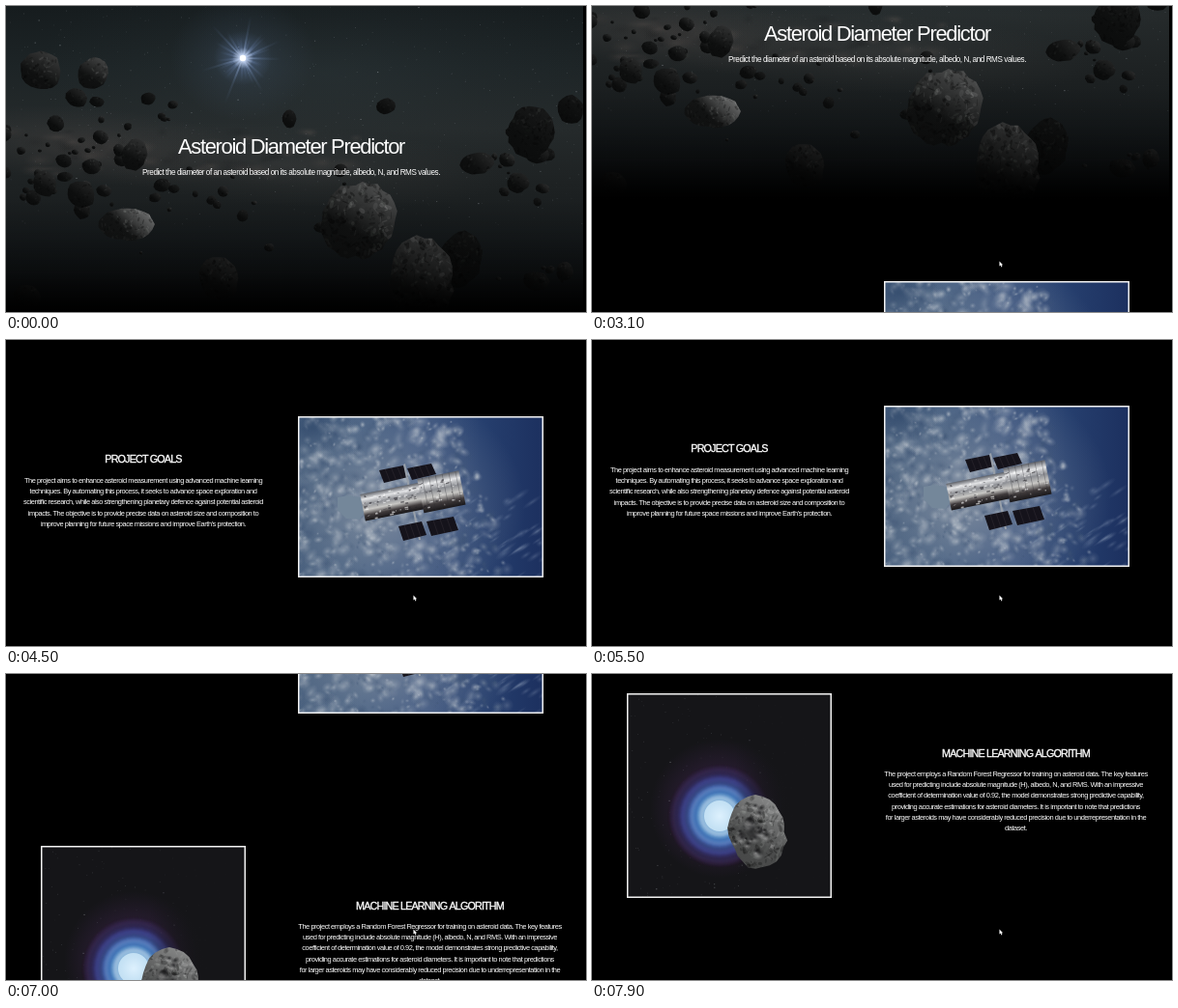
An HTML page with a canvas that plays this animation: 600x317 px, repeating every 8 s.

```html
<!DOCTYPE html>
<html lang="en">
<head>
<meta charset="utf-8">
<title>Asteroid Diameter Predictor</title>
<style>
html, body { margin: 0; width: 100%; height: 100%; overflow: hidden; background: #000; }
canvas { display: block; width: 600px; height: 317px; }
</style>
</head>
<body>
<canvas id="stage"></canvas>
<script>
const W = 600, H = 317, PAGE_H = 1004, LOOP = 8000;
const dpr = window.devicePixelRatio || 1;
const TAU = Math.PI * 2;

function setup(canvas, w, h) {
  canvas.width = w * dpr;
  canvas.height = h * dpr;
  const c = canvas.getContext('2d');
  c.scale(dpr, dpr);
  return c;
}

const stage = setup(document.getElementById('stage'), W, H);
const page = document.createElement('canvas');
const g = setup(page, W, PAGE_H);

let seed = 7;
function rnd(a = 0, b = 1) {
  seed = (seed + 0x6D2B79F5) | 0;
  let t = Math.imul(seed ^ (seed >>> 15), 1 | seed);
  t = (t + Math.imul(t ^ (t >>> 7), 61 | t)) ^ t;
  return a + (b - a) * (((t ^ (t >>> 14)) >>> 0) / 4294967296);
}

function repeat(n, fn) {
  for (let i = 0; i < n; i++) fn(i);
}

function rect(x, y, w, h, fill) {
  g.fillStyle = fill;
  g.fillRect(x, y, w, h);
}

// Evenly spaced colour stops
function gradient(x0, y0, x1, y1, ...colors) {
  const grad = g.createLinearGradient(x0, y0, x1, y1);
  colors.forEach((color, i) => grad.addColorStop(i / (colors.length - 1), color));
  return grad;
}

// Soft elliptical light; rgb is "r,g,b"
function glow(x, y, rx, ry, rgb, alpha, turn = 0) {
  g.save();
  g.translate(x, y);
  g.rotate(turn);
  g.scale(rx, ry);
  const grad = g.createRadialGradient(0, 0, 0, 0, 0, 1);
  grad.addColorStop(0, `rgba(${rgb},${alpha})`);
  grad.addColorStop(0.5, `rgba(${rgb},${alpha * 0.38})`);
  grad.addColorStop(1, `rgba(${rgb},0)`);
  g.fillStyle = grad;
  g.fillRect(-1, -1, 2, 2);
  g.restore();
}

function disc(x, y, r, fill) {
  g.fillStyle = fill;
  g.beginPath();
  g.arc(x, y, r, 0, TAU);
  g.fill();
}

function poly(fill, ...pts) {
  g.beginPath();
  for (let i = 0; i < pts.length; i += 2) g.lineTo(pts[i], pts[i + 1]);
  g.closePath();
  g.fillStyle = fill;
  g.fill();
}

function stars(n, w, h, alpha) {
  repeat(n, () => {
    const s = rnd() < 0.06 ? 1.1 : 0.6;
    rect(rnd(0, w), rnd(0, h), s, s, `rgba(225,232,240,${rnd(0.1, alpha)})`);
  });
}

// Shaping happens at ten times the size so that advances stay linear
function text(str, x, y, size, spacing, bold = 0) {
  g.save();
  g.translate(x, y + size * 0.35);
  g.scale(0.1, 0.1);
  g.font = `${size * 10}px "Liberation Sans", Arial, sans-serif`;
  g.letterSpacing = `${-spacing * size * 10}px`;
  g.textAlign = 'center';
  g.fillStyle = g.strokeStyle = '#fff';
  g.fillText(str, 0, 0);
  if (bold) {
    g.lineWidth = bold * 10;
    g.strokeText(str, 0, 0);
  }
  g.restore();
}

function heading(str, x, y) {
  text(str, x, y, 10.8, 0.08, 0.35);
}

function lines(list, x, y) {
  list.forEach((line, i) => text(line, x, y + i * 11.3, 7.5, 0.065));
}

// Irregular stone, lit from the upper right
function rock(x, y, rx, ry, lit, dark) {
  const size = Math.sqrt(rx * ry);
  const n = Math.round(9 + size * 0.5);
  const phase = rnd(0, TAU);
  const tone = v => `rgb(${v | 0},${v + 1 | 0},${v + 1 | 0})`;
  g.save();
  g.translate(x, y);
  g.beginPath();
  repeat(n, i => {
    const a = i / n * TAU;
    const k = 0.95 + 0.07 * Math.sin(2 * a + phase) + rnd(-0.06, 0.05);
    g.lineTo(Math.cos(a) * rx * k, Math.sin(a) * ry * k);
  });
  g.closePath();
  g.clip();
  rect(-rx * 1.1, -ry * 1.1, rx * 2.2, ry * 2.2, gradient(rx * 0.6, -ry * 0.85, -rx * 0.5, ry * 0.8,
    tone(lit), tone(lit * 0.55 + dark * 0.45), tone(dark + 2), tone(dark)));
  repeat(Math.min(420, 4 + size * size * 0.28), () => {
    const px = rnd(-rx, rx), py = rnd(-ry, ry);
    const facing = Math.max(0.15, 0.5 + 0.35 * px / rx - 0.45 * py / ry);
    g.fillStyle = rnd() < 0.45
      ? `rgba(170,172,170,${rnd(0, lit / 260) * facing})`
      : `rgba(0,0,0,${rnd(0.05, 0.35)})`;
    g.beginPath();
    g.ellipse(px, py, rnd(0.4, 0.9 + size * 0.09), rnd(0.3, 0.7 + size * 0.04), rnd(0, 3), 0, TAU);
    g.fill();
  });
  g.restore();
}

// Scatters stones around a centre, thinning out with distance
function cluster(n, x, y, dx, dy, maxR) {
  repeat(n, () => {
    const r = 2 + (maxR - 2) * Math.pow(rnd(), 1.6);
    rock(x + dx * (rnd(-1, 1) + rnd(-1, 1)) / 1.4, y + dy * (rnd(-1, 1) + rnd(-1, 1)) / 1.4,
      r * rnd(0.9, 1.2), r * rnd(0.75, 1.1), rnd(24, 50), 10);
  });
}

function sun(x, y) {
  glow(x, y, 75, 65, '90,115,150', 0.28);
  glow(x, y, 30, 28, '125,160,225', 0.4);
  repeat(26, i => {
    const len = i % 4 ? rnd(18, 34) : rnd(38, 58);
    g.save();
    g.translate(x, y);
    g.rotate(i / 26 * TAU + rnd(-0.1, 0.1));
    poly(gradient(0, 0, len, 0, 'rgba(190,212,250,.6)', 'rgba(130,160,210,.16)', 'rgba(110,140,190,0)'),
      0, -0.8, len, -1.2, len, 1.2, 0, 0.8);
    g.restore();
  });
  glow(x, y, 11, 11, '220,232,255', 1);
  disc(x, y, 3.2, '#fff');
}

function hero() {
  g.save();
  g.beginPath();
  g.rect(0, 0, 597, H);
  g.clip();
  rect(0, 0, 597, H, gradient(0, 0, 0, H, '#161c1e', '#1d2426', '#252a2b', '#1d2122', '#14181a', '#0a0c0d'));
  glow(330, 70, 300, 120, '60,72,76', 0.25);
  glow(90, 145, 170, 40, '105,92,88', 0.28, 0.08);
  glow(290, 165, 230, 42, '95,92,90', 0.24, 0.06);
  repeat(60, i => glow(rnd(0, 380), 152 + rnd(-22, 22), rnd(6, 20), rnd(3, 8),
    i % 2 ? '140,120,112' : '8,10,12', 0.13));
  stars(420, 597, 230, 0.4);
  sun(245, 54);

  cluster(46, 85, 155, 85, 50, 10);
  cluster(12, 215, 205, 60, 45, 9);
  cluster(16, 520, 165, 70, 42, 13);
  cluster(8, 555, 280, 40, 18, 13);
  cluster(5, 340, 215, 70, 40, 9);

  // x, y, half width, half height, brightness
  [
    [36, 67, 21, 23, 58], [90, 70, 16, 18, 66], [584, 107, 15, 15, 22], [543, 131, 27, 27, 24],
    [133, 154, 14, 17, 46], [487, 163, 19, 12, 36], [293, 117, 8, 10, 28], [393, 104, 10, 9, 26],
    [40, 184, 13, 14, 42], [78, 195, 16, 14, 34], [220, 282, 22, 23, 40], [22, 301, 15, 13, 26],
    [470, 262, 24, 31, 18], [125, 226, 28, 19, 112], [365, 222, 39, 44, 78], [429, 286, 38, 46, 60]
  ].forEach(([x, y, rx, ry, lit]) => rock(x, y, rx, ry, lit, 9 + lit / 12));

  rect(0, 200, 597, 117, gradient(0, 200, 0, H, 'rgba(0,0,0,0)', 'rgba(0,0,0,.15)', 'rgba(0,0,0,.4)', '#000'));
  g.restore();
  text('Asteroid Diameter Predictor', 295, 145, 22, 0.0606);
  text('Predict the diameter of an asteroid based on its absolute magnitude, albedo, N, and RMS values.',
    295, 172.5, 8.2, 0.057);
}

function framed(x, y, w, h, paint) {
  g.save();
  g.beginPath();
  g.rect(x, y, w, h);
  g.clip();
  g.translate(x, y);
  paint(w, h);
  g.restore();
  g.strokeStyle = '#f2f2f2';
  g.lineWidth = 1.5;
  g.strokeRect(x + 0.75, y + 0.75, w - 1.5, h - 1.5);
}

function panel(x, y, w, h) {
  poly('#15131b', x, y + 5, x + w, y, x + w + 5, y + h, x + 5, y + h + 6);
  g.strokeStyle = 'rgba(120,110,115,.3)';
  g.lineWidth = 0.5;
  g.beginPath();
  for (let k = 0.25; k < 1; k += 0.25) {
    g.moveTo(x + w * k, y + 5 - 5 * k);
    g.lineTo(x + 5 + w * k, y + h + 6 - 6 * k);
  }
  g.stroke();
}

function tube(x0, x1, half) {
  rect(x0, -half, x1 - x0, half * 2,
    gradient(0, -half, 0, half, '#5d6067', '#e3e4e6', '#8d8f94', '#c9c8c5', '#403b3c', '#191719'));
}

function satellite(w, h) {
  rect(0, 0, w, h, gradient(0, 0, w, 0, '#3f5878', '#435d80', '#3c5580', '#263f6e', '#1c305f'));
  glow(85, 95, 150, 130, '145,155,168', 0.75);
  // Clouds gather left of a diagonal coast line
  repeat(900, i => {
    const y = rnd(0, h), x = rnd(-5, 165 + y * 0.35), r = rnd(1.5, 7);
    const light = i % 3 ? '200,206,212' : '62,84,116';
    glow(x, y, r * rnd(0.8, 1.8), r, light, rnd(0.15, 0.5), rnd(-1.5, 1.5));
  });
  repeat(50, () => glow(rnd(150, w), rnd(80, h), rnd(4, 13), rnd(1.5, 4), '160,175,198', 0.25, -0.6));
  glow(15, 12, 42, 26, '48,72,106', 0.7);

  panel(84, 51, 25, 12);
  panel(113, 49, 25, 11);
  poly('#98a0aa', 109, 50, 111, 49, 127, 128, 125, 128);
  poly('#74879a', 41, 84, 52, 82, 64, 84, 69, 99, 64, 107, 50, 106, 41, 97);
  g.save();
  g.translate(120, 84);
  g.rotate(-0.2);
  tube(-54, 8, 14);
  tube(7, 51, 18);
  repeat(130, () => rect(rnd(-53, 46), rnd(-13, 13), rnd(0.6, 4), rnd(0.5, 1.8),
    rnd() < 0.55 ? 'rgba(250,250,250,.6)' : 'rgba(35,33,38,.55)'));
  for (let x = 12; x < 48; x += 7) rect(x, -18, 0.7, 36, 'rgba(45,45,50,.4)');
  g.restore();
  panel(104, 109, 24, 14);
  panel(133, 104, 28, 14);
}

function flare(w, h) {
  const x = 96, y = 127;
  rect(0, 0, w, h, '#151518');
  stars(230, w, h, 0.35);
  glow(x, y - 8, 72, 72, '105,55,135', 0.6);
  // Bands drift from pale blue to violet outwards
  for (let r = 54; r > 14; r -= 0.5) {
    const k = (r - 14) / 40;
    const wave = 0.5 + 0.5 * Math.cos(r * 0.62);
    const light = (1 - k) * 48 + 14 + wave * 16 * (1 - k * 0.5);
    disc(x, y, r, `hsla(${208 + 62 * k * k},${52 - 22 * k}%,${light}%,${0.36 - 0.29 * k})`);
  }
  disc(x, y, 16, '#b9daf0');
  glow(x, y, 25, 25, '225,243,255', 0.9);
  rect(112, 0, w - 112, h, gradient(112, 0, 168, 0, 'rgba(21,21,24,0)', 'rgba(21,21,24,.95)'));

  rock(135, 144, 33, 38, 135, 72);
  // Craters: a dark bowl with a pale lower rim
  repeat(24, () => {
    const a = rnd(0, TAU), d = rnd(3, 27), r = rnd(2, 6);
    const cx = 134 + Math.cos(a) * d, cy = 144 + Math.sin(a) * d * 1.1;
    glow(cx - 1, cy + r * 0.6, r, r * 0.8, '200,200,200', 0.55);
    glow(cx, cy, r, r * 0.8, '18,18,20', 0.75);
  });
  glow(129, 143, 12, 15, '28,28,30', 0.7);
}

function buildPage() {
  rect(0, 0, W, PAGE_H, '#000');
  hero();

  heading('PROJECT GOALS', 142, 446.5);
  lines([
    'The project aims to enhance asteroid measurement using advanced machine learning',
    'techniques. By automating this process, it seeks to advance space exploration and',
    'scientific research, while also strengthening planetary defence against potential asteroid',
    'impacts. The objective is to provide precise data on asteroid size and composition to',
    'improve planning for future space missions and improve Earth\u2019s protection.'
  ], 142, 468);
  framed(302, 402, 254, 167, satellite);

  framed(36, 706, 212, 212, flare);
  heading('MACHINE LEARNING ALGORITHM', 438.5, 768);
  lines([
    'The project employs a Random Forest Regressor for training on asteroid data. The key features',
    'used for predicting include absolute magnitude (H), albedo, N, and RMS. With an impressive',
    'coefficient of determination value of 0.92, the model demonstrates strong predictive capability,',
    'providing accurate estimations for asteroid diameters. It is important to note that predictions',
    'for larger asteroids may have considerably reduced precision due to underrepresentation in the',
    'dataset.'
  ], 438.5, 789);
}

// Each flick: start time, duration, scroll position reached
const flicks = [[2750, 750, 161], [3950, 750, 328], [5450, 900, 517.5], [6920, 920, 686]];
const clamp = v => Math.max(0, Math.min(1, v));

function scrollAt(t) {
  let pos = 0;
  for (const [start, span, to] of flicks) {
    const u = clamp((t - start) / span);
    pos += (to - pos) * (1 - Math.pow(1 - Math.pow(u, 1.7), 4));
  }
  return Math.round(pos);
}

function cursor(t) {
  if (t < 1900) return;
  const k = Math.pow(1 - clamp((t - 1900) / 300), 2);
  stage.save();
  stage.translate(421.5 + 44 * k, 264.5 + 38 * k);
  stage.scale(0.85, 0.85);
  stage.beginPath();
  [[0, 0], [0, 6], [1.4, 4.8], [2.4, 7], [3.4, 6.5], [2.5, 4.5], [4.2, 4.3]]
    .forEach(([x, y]) => stage.lineTo(x, y));
  stage.closePath();
  stage.lineWidth = 1;
  stage.strokeStyle = '#111';
  stage.stroke();
  stage.fillStyle = '#fff';
  stage.fill();
  stage.restore();
}

function draw(now) {
  const t = now % LOOP;
  stage.drawImage(page, 0, -scrollAt(t), W, PAGE_H);
  cursor(t);
}

buildPage();
const begin = performance.now();
draw(0);
requestAnimationFrame(function tick() {
  draw(performance.now() - begin);
  requestAnimationFrame(tick);
});
</script>
</body>
</html>
```
